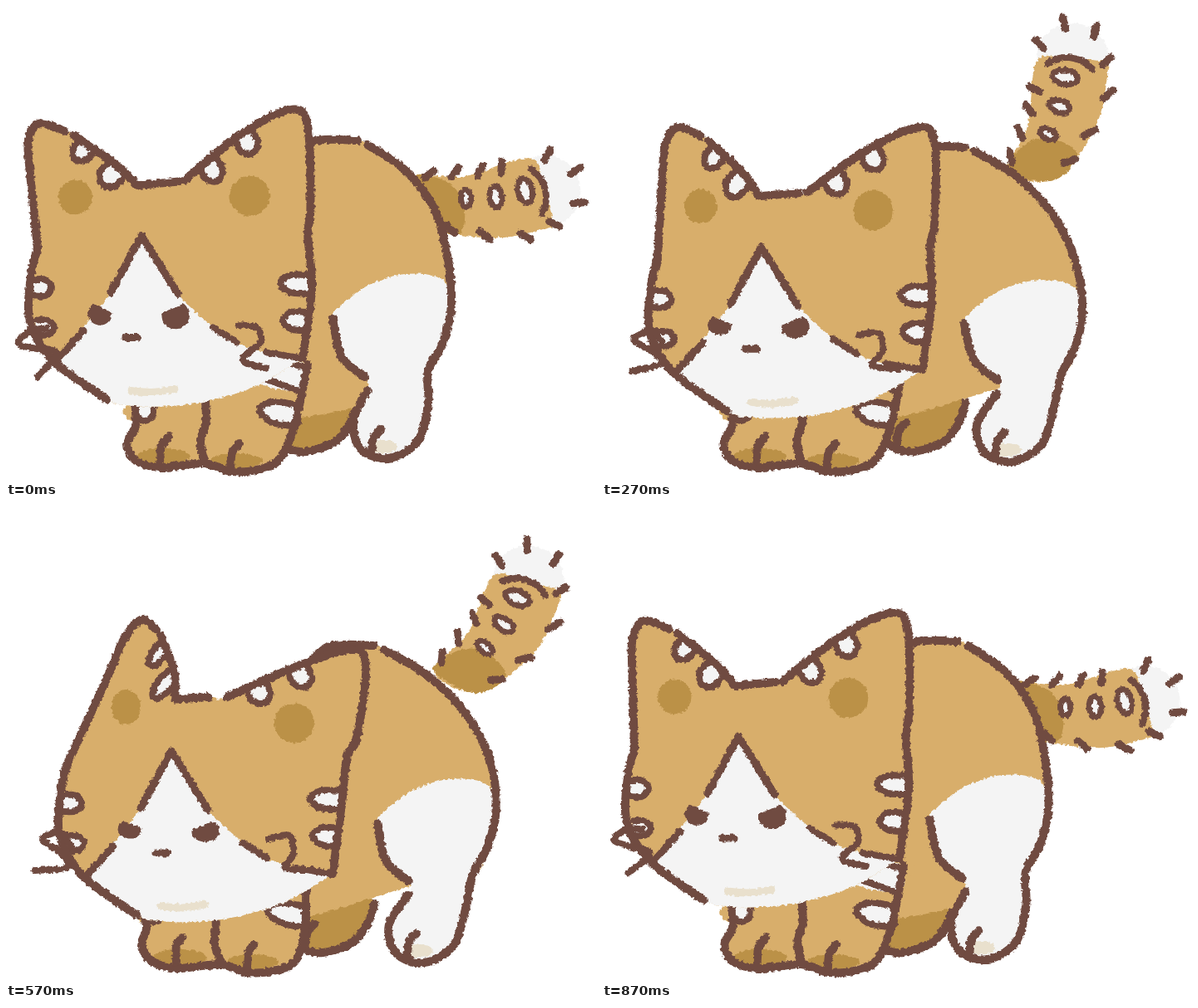
An HTML page with a canvas for the animation above (900 ms loop, 710x570 px).

```html
<!DOCTYPE html>
<html lang="en">
<head>
<meta charset="utf-8">
<title>Cat</title>
<style>
html, body { margin: 0; width: 100%; height: 100%; overflow: hidden; background: #fff; }
canvas { display: block; filter: url(#rough); }
svg { position: absolute; width: 0; height: 0; }
</style>
</head>
<body>
<svg><filter id="rough" x="0" y="0" width="100%" height="100%" color-interpolation-filters="sRGB">
  <feTurbulence type="fractalNoise" baseFrequency=".25" numOctaves="2" seed="4"/>
  <feDisplacementMap in="SourceGraphic" scale="5" xChannelSelector="R" yChannelSelector="G"/>
</filter></svg>
<canvas id="stage" width="710" height="570"></canvas>
<script>
const ctx = document.getElementById('stage').getContext('2d');
const LOOP = 900, STEP = 30, RAD = Math.PI / 180;
const BROWN = '#704b41', ORANGE = '#d8ae6b', TAN = '#bb9147', WHITE = '#f4f4f4', CREAM = '#e9e0cd';

const clamp = (v, a = 0, b = 1) => Math.min(b, Math.max(a, v));
const mix = (a, b, f) => a + (b - a) * f;
const ease = f => (f = clamp(f), f * f * (3 - 2 * f));

// Everything that moves, as eased pulses and two-harmonic swings
function poseAt(t) {
  const pulse = (start, full, release, end) => {
    const u = (t - start + LOOP) % LOOP;
    return ease(u / (full - start)) - ease((u + start - release) / (end - release));
  };
  const swing = (mean, amp, phase, amp2, phase2) => {
    const a = t / LOOP * 360;
    return mean + amp * Math.cos((a - phase) * RAD) + amp2 * Math.cos((2 * a - phase2) * RAD);
  };

  const flat = pulse(160, 480, 700, 920);
  const squint = pulse(60, 360, 760, 920);
  const stride = pulse(0, 110, 720, 900);
  const push = pulse(230, 450, 500, 700);
  const dip = 10 * pulse(120, 330, 470, 670);

  const rump = [54 * pulse(0, 400, 560, 900), dip];
  const foot = [32 * stride + 15 * push, 4 * stride];
  const angle = swing(38.4, 26.8, 149, 13.8, 163);
  return {
    flat, squint, rump, foot,
    head: [36 * pulse(0, 380, 600, 900), 18 * pulse(-40, 400, 660, 860)],
    earL: [88 * flat, -24 * Math.sin(flat * Math.PI / 2)],
    earR: [36 * flat, 30 * flat],
    back: [swing(12.7, 21, 197, 12.8, -55), dip - 3],
    ankle: [(rump[0] + foot[0]) / 2 + dip, 4 * stride],
    far: 14 * stride - 14 + 9 * push,
    paw: 21 * pulse(230, 450, 600, 950),
    tail: [510 + 50 * pulse(200, 340, 600, 930), 250 - swing(26.9, 21.9, 131, 17.4, 135)],
    angle,
    tip: swing(56.4, 35.7, 168, 9, 204)
  };
}

const parse = s => s.split(' ').map(p => p.split(',').map(Number));
const same = p => p;
const shift = (dx, dy) => ([x, y]) => [x + dx, y + dy];
const oval = (x, y, rx, ry, from = 0, sweep = 360, n = 12) => Array.from({ length: n }, (_, i) => {
  const a = (from + sweep * i / (sweep === 360 ? n : n - 1)) * RAD;
  return [x + rx * Math.cos(a), y + ry * Math.sin(a)];
});

// Smooth path; a repeated point makes a corner
function trace(shape, map, closed) {
  const p = (typeof shape === 'string' ? parse(shape) : shape).map(map), n = p.length;
  const at = i => closed ? p[(i + n) % n] : p[clamp(i, 0, n - 1)];
  ctx.beginPath();
  ctx.moveTo(...p[0]);
  for (let i = 0; i < (closed ? n : n - 1); i++) {
    const [a, b, c, d] = [at(i - 1), at(i), at(i + 1), at(i + 2)];
    if (b[0] === c[0] && b[1] === c[1]) continue;
    ctx.bezierCurveTo(b[0] + (c[0] - a[0]) / 6, b[1] + (c[1] - a[1]) / 6,
      c[0] - (d[0] - b[0]) / 6, c[1] - (d[1] - b[1]) / 6, c[0], c[1]);
  }
}
function fill(shape, map, color) {
  trace(shape, map, true);
  ctx.fillStyle = color;
  ctx.fill();
}
function line(shape, map, width = 10, color = BROWN) {
  trace(shape, map, false);
  ctx.lineWidth = width;
  ctx.strokeStyle = color;
  ctx.stroke();
}
// White tongue growing from the middle of its open end
function stripe(x, y, angle, len, half, map) {
  const c = Math.cos(angle * RAD), s = Math.sin(angle * RAD);
  const shape = [[0, -1], [.65, -.95], [1, 0], [.65, .95], [0, 1]].map(([u, v]) =>
    [x + u * len * c - v * half * s, y + u * len * s + v * half * c]);
  fill(shape, map, WHITE);
  line(shape, map, 8);
}
const toe = (x, y, map) => line([[x + 11, y - 29], [x + 2, y - 18], [x, y]], map);

function drawTail(k) {
  const bend = k.angle + 8 + (k.tip - k.angle) / 4;
  const angle = s => RAD * (s < 18 ? k.angle
    : s < 54 ? mix(k.angle, bend, (s - 18) / 36)
    : mix(bend, k.tip, clamp((s - 54) / 18)));
  // (distance along the spine, offset to its right), from the first spot
  const map = ([s, o]) => {
    const c = Math.cos(angle(0)), d = Math.sin(angle(0)), n = 24;
    let x = k.tail[0] + 43 * c - 16 * d, y = k.tail[1] - 43 * d - 16 * c;
    for (let i = 0; i < n; i++) {
      const a = angle(s * (i + .5) / n);
      x += s / n * Math.cos(a);
      y -= s / n * Math.sin(a);
    }
    const a = angle(s);
    return [x + o * Math.sin(a), y + o * Math.cos(a)];
  };
  const hair = (s, o, tilt) => {
    const dx = 7 * Math.cos(tilt * RAD), dy = 7 * Math.sin(tilt * RAD);
    line([[s - dx, o + dy], [s + dx, o - dy]], map, 9);
  };

  fill(oval(97, 6, 41, 43), map, WHITE);
  fill('-62,-27 0,-27 86,-37 95,-6 96,20 97,50 97,50 40,50 -12,43 -50,26', map, ORANGE);
  fill('-62,-27 -36,-27 -12,-12 -2,18 -12,43 -50,26', map, TAN);
  line(oval(62, 4, 34, 38, -46, 92, 5), map, 8);
  for (let i = 0; i < 3; i++) {
    const spot = oval(36 * i, 0, 6 + 1.3 * i, 10.5 + 2.3 * i);
    fill(spot, map, WHITE);
    line([...spot, spot[0]], map, 7);
    hair(40 * i - 20, 36 + 9 * i, -45);
  }
  for (let i = 0; i < 4; i++) {
    const a = (75 - 55 * i) * RAD;
    hair(31 * i - 43, -31 - i, 35 + 12 * i);
    hair(97 + 42 * Math.cos(a), 5 - 42 * Math.sin(a), 50 - 30 * i);
  }
}

const REAR = parse('330,195 370,166 423,165 435,170 480,200 515,245 531,300 536,360 526,405 508,440 508,480 495,525 460,545 427,534 418,500 435,463');
const SHIN = parse('432,447 404,423 393,377');

function drawRear(k) {
  const levels = [[170, k.back], [310, k.rump], [445, k.ankle], [490, k.foot]];
  const map = ([x, y]) => {
    const i = levels.filter(l => y > l[0]).length;
    const [y0, a] = levels[clamp(i - 1, 0, 2)], [y1, b] = levels[clamp(i, 1, 3)];
    const f = clamp((y - y0) / (y1 - y0));
    return [x + mix(a[0], b[0], f), y + mix(a[1], b[1], f)];
  };
  const far = shift(k.far, 0);
  const farFoot = parse('338,522 352,533 375,537 410,525 428,503 437,478');
  fill([...farFoot, [400, 450], [335, 470]], far, TAN);
  line(farFoot, far);
  toe(354, 531, far);

  const belly = [426 + k.ankle[0], 483 - .45 * k.ankle[0]];
  fill([...REAR.slice(0, 10).map(map), belly, belly, [355, 496], [300, 496], [300, 230]], same, ORANGE);
  fill([...REAR.slice(7), ...SHIN, ...parse('402,362 435,337 480,323 524,329')], map, WHITE);
  fill(oval(454, 531, 17, 8), map, CREAM);
  line(REAR.slice(0, 3), map);
  line(REAR.slice(3), map);
  line(SHIN, map);
  toe(440, 539, map);
}

function drawFront(k) {
  const map = ([x, y]) => [x + k.paw * clamp((y - 440) / 100), y];
  const outline = parse('155,478 155,507 145,527 154,547 185,556 237,551 270,561 305,558 328,546 345,510 356,465 363,432');
  fill(outline, map, ORANGE);
  fill(oval(188, 543, 32, 10), map, TAN);
  fill(oval(276, 548, 31, 9), map, TAN);
  stripe(166, 480, 90, 20, 11, map);
  fill('300,452 330,428 362,434 356,464', map, WHITE);
  line('314,450 355,465', map, 8);
  line('340,430 361,436', map, 8);
  stripe(349, 494, 190, 45, 13, map);
  line(outline, map);
  line('239,470 240,500 233,525 238,550', map);
  toe(184, 548, map);
  toe(269, 556, map);
}

const HEAD = parse('122,474 58,428 29,380 30,325 38,291 28,205 25,163 38,142 69,151 80,156 130,190 158,216 208,211 214,210 280,155 340,124 362,142 366,240 363,275 368,340 357,424');
const CHIN = parse('357,424 300,458 240,476 190,482 150,481');

function drawHead(k) {
  const rigid = shift(...k.head);
  // Ears lean away from their base lines
  const map = ([x, y]) => {
    let dx = 0, dy = 0;
    if (x < 190) {
      const w = Math.max(0, (121 * (285 - y) - 59 * (x - 37)) / 17005) ** .85;
      dx = w * k.earL[0];
      dy = w * k.earL[1];
    } else if (x > 211) {
      const w = Math.sqrt(Math.max(0, (163 * (235 - y) + 55 * (x - 200)) / 25365));
      dx = w * k.earR[0];
      dy = w * k.earR[1] * clamp((x - 205) / 90);
    }
    return rigid([x + dx, y + dy]);
  };

  fill([...HEAD, ...CHIN], map, ORANGE);
  const apex = [163, 276];
  fill([apex, apex, [126, 345], HEAD[1], HEAD[1], HEAD[0], ...[...CHIN].reverse(),
    CHIN[0], [280, 406], [207, 347]], rigid, WHITE);
  fill(oval(...map([83, 230]), 20.5 - 3 * k.flat, 21), same, TAN);
  fill(oval(...map([293, 228]), 24, 24), same, TAN);

  stripe(96, 168, 130, 22, 11, map);
  stripe(131, 198, 132, 23, 13, map);
  stripe(243, 189, 62, 24, 12, map);
  stripe(286, 156, 65, 23, 12, map);
  stripe(34, 339, 0, 21, 10, rigid);
  stripe(37, 387, 0, 21, 9, rigid);
  stripe(366, 335, 182, 36, 11, rigid);
  stripe(364, 380, 184, 31, 11, rigid);

  for (const [from, to] of [[0, 5], [4, 9], [9, 12], [11, 13], [13, 21]]) line(HEAD.slice(from, to), map);

  line([[126, 345], apex, apex, [207, 347]], rigid, 9);
  line('93,391 62,425', rigid, 9);
  line('249,387 278,405', rigid, 8);
  line('313,417 355,424', rigid, 8);
  line('144,399 158,399', rigid, 9);
  line('150,463 176,465 203,461', rigid, 9, CREAM);

  const eye = (x, y, r, side) => {
    const arc = oval(x, y, r * side, r * (1 - .2 * k.squint), -5, 240, 8);
    fill([arc[0], ...arc, arc[7]], rigid, BROWN);
  };
  eye(113, 370, 14.5, 1);
  eye(204, 372, 17, -1);

  // Whiskers swing between a low and a raised curl
  const whisker = (low, high) => {
    const end = parse(high);
    line(parse(low).map(([x, y], i) => [mix(x, end[i][0], k.squint), mix(y, end[i][1], k.squint)]), rigid, 8);
  };
  whisker('280,384 301,387 306,405 284,426 312,437', '280,382 305,378 310,400 300,417 332,419');
  whisker('49,388 30,392 15,407 40,414 62,418 40,448', '42,391 30,374 8,382 30,399 38,416 -1,420');
}

function draw(t) {
  const k = poseAt(t);
  ctx.fillStyle = '#fff';
  ctx.fillRect(0, 0, 710, 570);
  ctx.lineCap = ctx.lineJoin = 'round';
  drawTail(k);
  drawRear(k);
  drawFront(k);
  drawHead(k);
}

let shown = -1;
function tick() {
  const t = Math.floor(performance.now() % LOOP / STEP) * STEP;
  if (t !== shown) draw(shown = t);
  requestAnimationFrame(tick);
}
tick();
</script>
</body>
</html>
```
